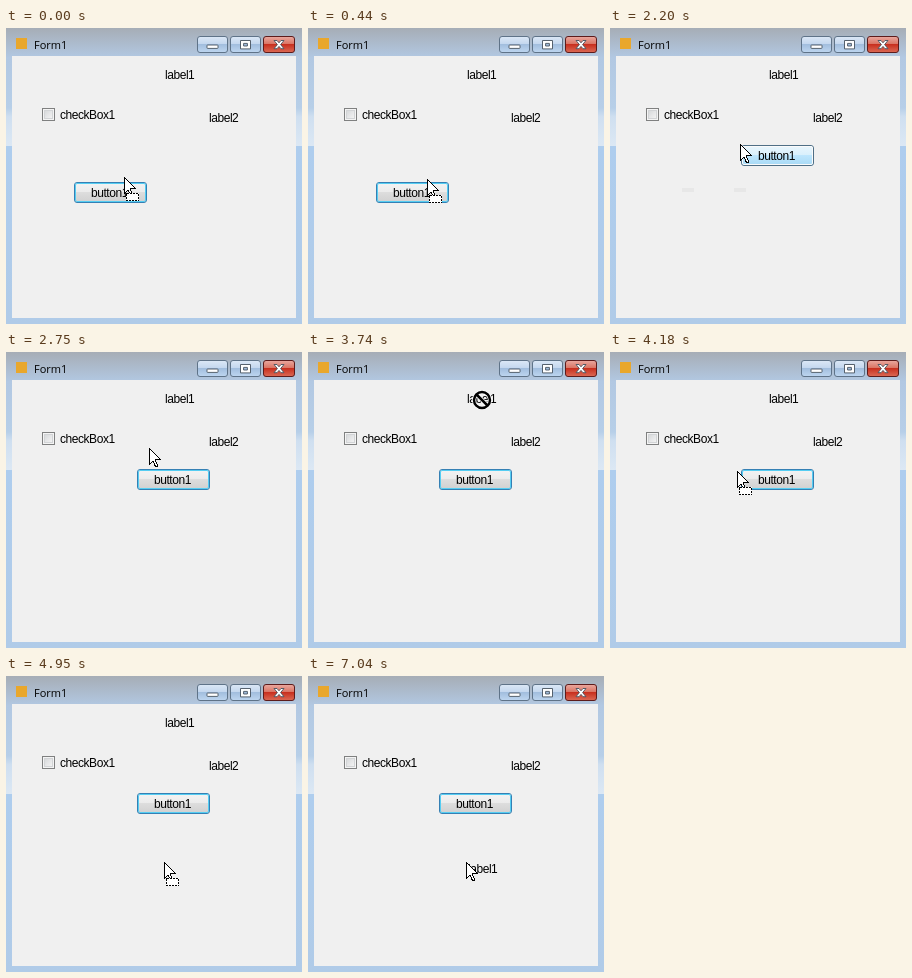
These frames come from a looping animation (296x296 px, 7.37 s). An HTML page:

```html
<!DOCTYPE html>
<html lang="en">
<head>
<meta charset="utf-8">
<title>Form1</title>
<style>
  html, body { margin: 0; width: 100%; height: 100%; overflow: hidden; background: #b0cbe8; }
  svg { display: block; width: 100vw; height: 100vh; }
  text { font: 12px "Liberation Sans", Arial, sans-serif; letter-spacing: -.45px; fill: #000; }
  .title { font: 11px "Open Sans", "Noto Sans", sans-serif; letter-spacing: 0; }
  .glyph { fill: #fff; stroke: #46525e; stroke-width: .9; }
  .crisp { shape-rendering: crispEdges; }
</style>
</head>
<body>
<svg viewBox="0 0 296 296">
  <defs>
    <linearGradient id="glass" x2="0" y2="1">
      <stop offset="0" stop-color="#a6adb6"/>
      <stop offset=".1" stop-color="#b2c8e2"/>
      <stop offset=".27" stop-color="#b7cfe8"/>
      <stop offset=".3" stop-color="#cfdff0"/>
      <stop offset=".4" stop-color="#dce8f4"/>
      <stop offset=".4" stop-color="#aecdee"/>
      <stop offset="1" stop-color="#b0cbe8"/>
    </linearGradient>
    <linearGradient id="caption" x2="0" y2="1">
      <stop offset="0" stop-color="#dce8f6"/>
      <stop offset=".5" stop-color="#c2d6ee"/>
      <stop offset=".5" stop-color="#a2bede"/>
      <stop offset="1" stop-color="#bed6f0"/>
    </linearGradient>
    <linearGradient id="close" x2="0" y2="1">
      <stop offset="0" stop-color="#eaa9a0"/>
      <stop offset=".5" stop-color="#d9705f"/>
      <stop offset=".5" stop-color="#c8301f"/>
      <stop offset="1" stop-color="#dc6a55"/>
    </linearGradient>
    <linearGradient id="face" x2="0" y2="1">
      <stop offset="0" stop-color="#f3f3f3"/>
      <stop offset=".5" stop-color="#ebebeb"/>
      <stop offset=".5" stop-color="#dddddd"/>
      <stop offset="1" stop-color="#d0d0d0"/>
    </linearGradient>
    <linearGradient id="hot" x2="0" y2="1">
      <stop offset="0" stop-color="#eaf6fd"/>
      <stop offset=".5" stop-color="#d9f0fc"/>
      <stop offset=".5" stop-color="#bee6fd"/>
      <stop offset="1" stop-color="#a7d9f5"/>
    </linearGradient>
    <linearGradient id="box" x2="1" y2="1">
      <stop offset="0" stop-color="#d6d8da"/>
      <stop offset="1" stop-color="#f4f4f4"/>
    </linearGradient>
    <path id="sign" d="M-8 0a8 8 0 1 0 16 0a8 8 0 1 0 -16 0M-5.5 -5.5L5.5 5.5"/>
  </defs>

  <rect width="296" height="296" fill="url(#glass)"/>
  <rect x="6" y="28" width="284" height="262" fill="#f0f0f0"/>

  <rect x="10" y="10" width="11" height="11" fill="#e9a72c"/>
  <text class="title" x="28" y="21">Form1</text>

  <g stroke="#5f7388">
    <rect x="191.5" y="8.5" width="30" height="16" rx="2.5" fill="url(#caption)"/>
    <rect x="224.5" y="8.5" width="30" height="16" rx="2.5" fill="url(#caption)"/>
    <rect x="257.5" y="8.5" width="31" height="16" rx="2.5" fill="url(#close)" stroke="#5c1c1c"/>
  </g>
  <rect class="glyph" x="201" y="17" width="11" height="3.4" rx=".6"/>
  <path class="glyph" fill-rule="evenodd" d="M234.5 12.5h10v8.4h-10zM237.6 15.4v2.6h3.8v-2.6z"/>
  <path class="glyph" d="M268 12.5h3l2 2.3 2-2.3h3l-3.4 4.1 3.4 4.1h-3l-2-2.3-2 2.3h-3l3.4-4.1z"/>

  <rect x="36.5" y="80.5" width="12" height="12" fill="#f4f4f4" stroke="#7f8080"/>
  <rect x="38.5" y="82.5" width="8" height="8" fill="url(#box)" stroke="#d2d4d6"/>
  <text x="54" y="91">checkBox1</text>
  <text x="203" y="94">label2</text>
  <text id="label" x="159" y="51">label1</text>

  <g id="trace" fill="#e7e7e7">
    <rect x="72" y="160" width="12" height="4"/>
    <rect x="124" y="160" width="12" height="4"/>
  </g>

  <g id="button">
    <rect id="edge" x=".5" y=".5" width="72" height="20" rx="2.5"/>
    <rect id="rim" x="1.5" y="1.5" width="70" height="18" rx="1.5" fill="none"/>
    <text x="17" y="15">button1</text>
  </g>

  <g id="cursor">
    <g id="arrow" class="crisp">
      <path d="M.5 .5V16.5L4 13 6.5 18.5H8.5V17L6.5 12.5V11.5H11.5Z" fill="#fff" stroke="#000"/>
      <g id="drop">
        <rect x="2.5" y="16.5" width="12" height="7" fill="#fff" stroke="#fff"/>
        <rect x="2.5" y="16.5" width="12" height="7" fill="none" stroke="#000" stroke-dasharray="2 1"/>
      </g>
    </g>
    <g id="deny" fill="none">
      <use href="#sign" stroke="#fff" stroke-width="4"/>
      <use href="#sign" stroke="#000" stroke-width="2.5"/>
    </g>
  </g>
</svg>
<script>
  const LOOP = 7370, TICK = 110;
  const $ = id => document.getElementById(id);
  const show = (id, on) => { $(id).style.display = on ? '' : 'none'; };
  const move = (id, x, y) => $(id).setAttribute('transform', `translate(${x} ${y})`);

  // Pointer strokes: start time, then one point per tick.
  const strokes = [
    [0, [118, 149], [117, 165], [117, 174], [118, 166], [119, 151], [121, 141], [124, 130], [127, 120], [130, 116]],
    [2750, [143, 96], [160, 67], [174, 48]],
    [3740, [174, 48], [164, 62], [150, 80], [136, 100], [127, 119], [124, 132],
      [123, 145], [126, 155], [133, 166], [143, 176], [152, 183], [158, 186]]
  ];
  // Pointer shape, held until the next time.
  const shapes = [[0, 'drop'], [110, 'deny'], [440, 'drop'], [2200, 'arrow'],
    [3740, 'deny'], [3850, 'drop'], [7040, 'arrow']];

  const held = (list, t) => list.filter(e => e[0] <= t).pop();

  function pointer(t) {
    const [start, ...points] = held(strokes, t);
    return points[Math.min(points.length - 1, Math.floor((t - start) / TICK))];
  }

  function draw(t) {
    const shape = held(shapes, t)[1];
    const moved = t >= 2200, hot = moved && t < 2750;

    move('cursor', ...pointer(t));
    show('arrow', shape !== 'deny');
    show('drop', shape === 'drop');
    show('deny', shape === 'deny');

    move('button', moved ? 131 : 68, moved ? 117 : 154);
    $('edge').setAttribute('fill', hot ? 'url(#hot)' : 'url(#face)');
    $('edge').setAttribute('stroke', hot ? '#4f6f86' : '#3580b4');
    $('rim').setAttribute('stroke', hot ? '#fafafa' : '#55cdf2');
    show('trace', moved && t < 2310);

    if (t >= 7040) move('label', 1, 146);
    else move('label', 0, 0);
  }

  const origin = performance.now();
  function frame() {
    draw((performance.now() - origin) % LOOP);
    requestAnimationFrame(frame);
  }
  draw(0);
  requestAnimationFrame(frame);
</script>
</body>
</html>
```
